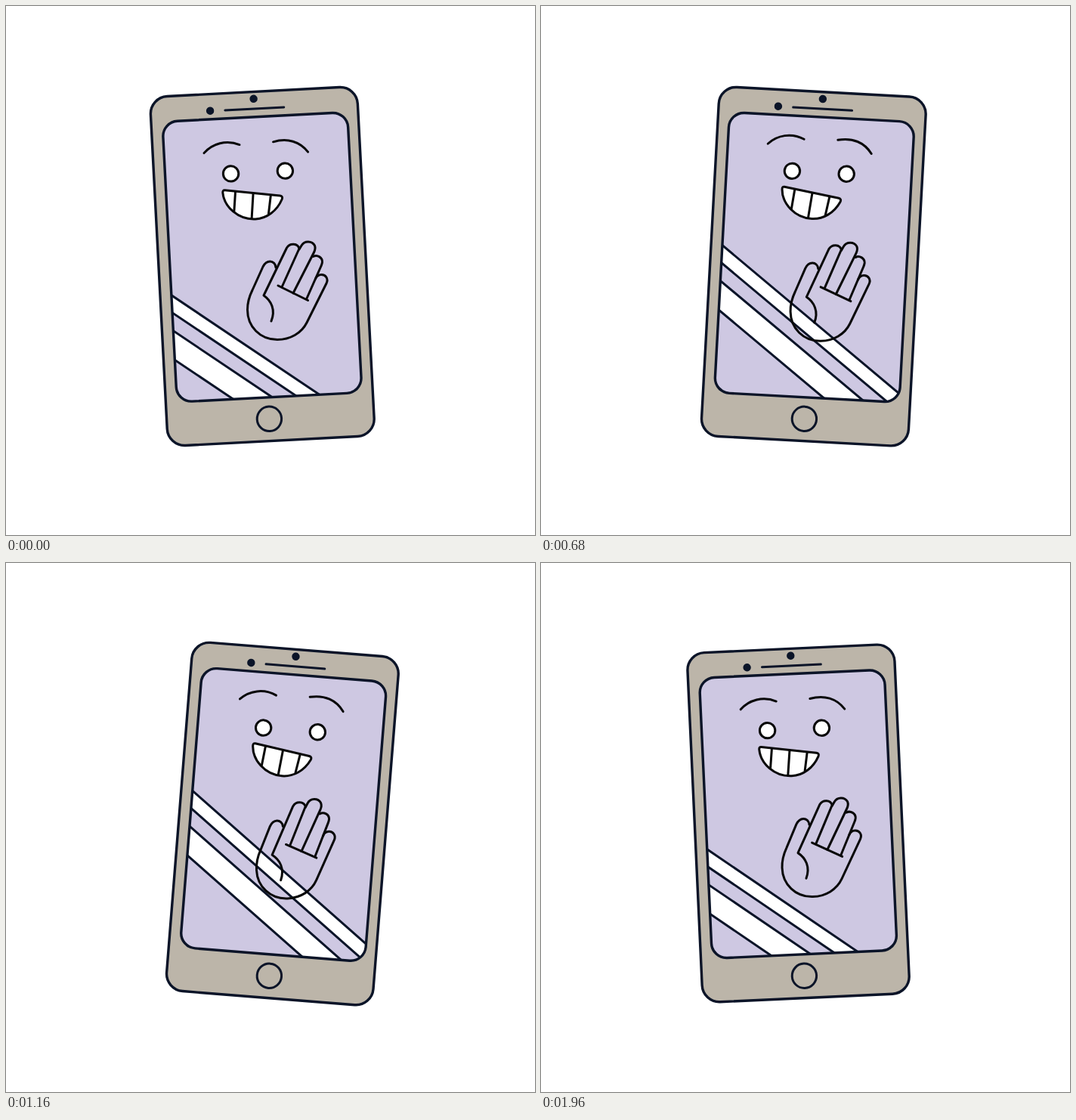
Animation of 700 by 700 pixels, one loop 2 s. Source, as an HTML page:

```html
<!DOCTYPE html>
<html lang="en">
<head>
<meta charset="utf-8">
<title>Waving phone</title>
<style>
  html, body { margin: 0; width: 100%; height: 100%; overflow: hidden; background: #fff; }
  svg { display: block; width: 100vw; height: 100vh; }
  .ink { stroke: #0b1428; stroke-width: 3.4; }
  .line { stroke: #080808; stroke-width: 3; stroke-linecap: round; stroke-linejoin: round; }
</style>
</head>
<body>
<svg viewBox="0 0 700 700" fill="none">
  <defs>
    <clipPath id="glass"><rect x="227.6" y="146.4" width="245.1" height="371.4" rx="20"/></clipPath>
  </defs>
  <g id="phone">
    <rect class="ink" x="212.7" y="113" width="274.3" height="462.6" rx="23" fill="#bcb5a9"/>
    <rect x="227.6" y="146.4" width="245.1" height="371.4" rx="20" fill="#cec8e2"/>
    <g clip-path="url(#glass)">
      <g id="stripes" class="ink" style="stroke-width:3" fill="#fff">
        <path d="M180 340.5l340 255v23.2l-340-255z"/>
        <path d="M180 387.6l340 255v38.6l-340-255z"/>
      </g>
    </g>
    <rect class="ink" x="227.6" y="146.4" width="245.1" height="371.4" rx="20"/>
    <path class="ink" style="stroke-width:3" stroke-linecap="round" d="M311.3 135.5h78"/>
    <g fill="#0b1428">
      <circle cx="291.5" cy="135.2" r="5.2"/>
      <circle cx="349.8" cy="122.3" r="5.2"/>
    </g>
    <circle class="ink" style="stroke-width:3" cx="348.4" cy="546.3" r="16.2"/>
    <g class="line">
      <path id="brows" d="M280.5 190.6C292 178.500 311 174 328 182M372.700 180.600C392 176 408 182 418 196.300"/>
      <g fill="#fff">
        <circle cx="314.6" cy="219.7" r="10.2"/>
        <circle cx="386.5" cy="219.7" r="10.2"/>
        <path d="M305.5 241.200L378 252.200Q382 253 380.300 257C373 272 359 281.300 344 281.300C321 281.300 303.500 263 302.600 244.500Q302.400 240.800 305.500 241.200Z"/>
      </g>
      <path d="M319.300 244L316.300 269.500M342.700 247.500L339 280.500M365.800 251L361.600 275.500"/>
    </g>
  </g>
  <g id="hand" class="line">
    <path d="M357 346C357 341 353 338 349.500 338C345 338 342 341 340 345L326 376C321 386 319.500 393 319.500 402C319.500 424 336 441.500 359 441.500C376 441.500 391 433 398 419L424 367C427 361 423 355.500 417.500 355.500C414 355.500 411 357.500 409.500 361"/>
    <path d="M351 417C357 402 351 390 341 383L371.500 320C376 313 386 314 388 321L365 372"/>
    <path d="M388 322L391 317C395 310 405 310.500 408.500 317Q410 321 407.500 326L380 380"/>
    <path d="M406.500 331.500C412 328.500 419 333 418.500 339Q418 342 417 344L397.500 388"/>
    <path d="M360 370L399.500 389.500"/>
  </g>
</svg>
<script>
  const HOME = '348.3 546', WRIST = '359.5 441';
  const move = (id, value) => document.getElementById(id).setAttribute('transform', value);

  function draw() {
    const t = Math.floor(performance.now() % 2000 / 40) * 0.04;
    const tilt = Math.min(t, 2 - t);
    const wave = Math.min(t, 2.156 - t); // the wave turns slightly later than the phone
    move('phone', `rotate(${9 * tilt - 3} ${HOME})`);
    move('stripes', `translate(0 ${-78.5 * tilt})`);
    move('brows', `translate(0 ${-7.6 * tilt})`);
    move('hand', `rotate(${9 * tilt} ${HOME}) rotate(${-10.2 * wave} ${WRIST})`);
    requestAnimationFrame(draw);
  }
  draw();
</script>
</body>
</html>
```
